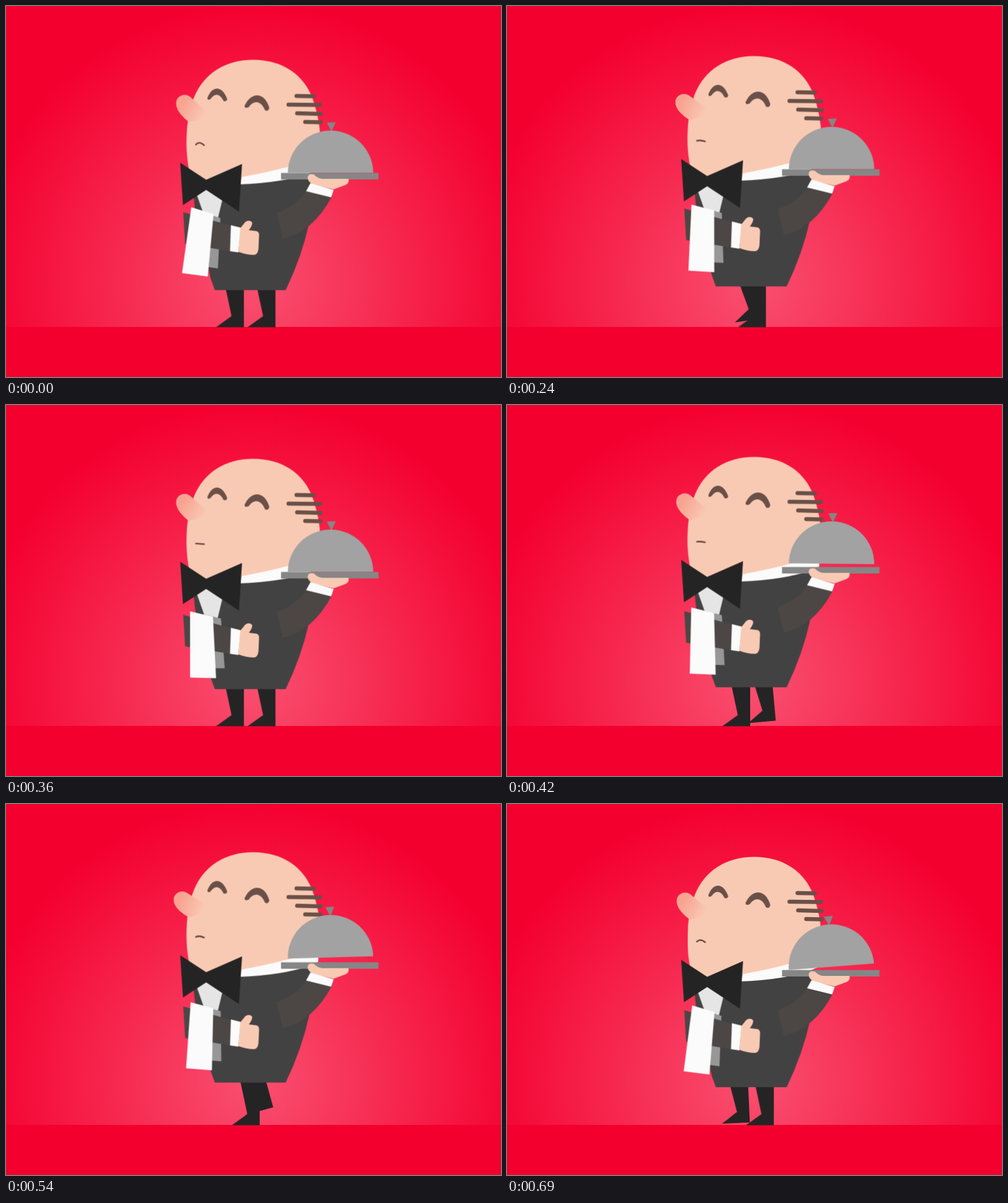
An HTML page that plays this animation: 800 by 600 pixels, repeating every 0.72 s.

```html
<!DOCTYPE html>
<html lang="en">
<head>
<meta charset="utf-8">
<title>Walking waiter</title>
<style>
  html, body { margin: 0; width: 100%; height: 100%; overflow: hidden; background: #f4002f; }
  svg { display: block; width: 100vw; height: 100vh; }

  .skin { fill: #f9cab3; }
  .black { fill: #252424; }
  .coat { fill: #434242; }
  .sleeve { fill: #4c4744; }
  .white { fill: #fbfbfb; }
  .steel { fill: #868686; }
  .hair { fill: none; stroke: #6a5048; stroke-width: 6.4; stroke-linecap: round; }
  .brow { fill: #6a5048; }
  .mouth { fill: none; stroke: #6a4c44; stroke-width: 2.6; stroke-linecap: round; }

  /* 24 poses per loop: each segment is split into 30 ms steps */
  .bob, .nose, .slide, .swing, .arm, .front, .back, .mouth, .tray, .lid {
    animation: 720ms steps(12) infinite;
  }

  .bob { animation-name: bob; animation-duration: 360ms; animation-timing-function: steps(6); }
  @keyframes bob { 50% { transform: translateY(-9px); } }

  .nose {
    transform-origin: 325px 183px;
    animation-name: nose; animation-duration: 360ms; animation-timing-function: steps(6);
  }
  @keyframes nose { 0%, 100% { transform: rotate(0deg); } 50% { transform: rotate(-10deg); } }

  .slide { animation-name: slide; }
  @keyframes slide {
    0%, 100% { transform: translateX(0); }
    50% { transform: translateX(51px); }
  }
  .swing {
    transform-origin: 384px 437px;
    animation-name: swing; animation-timing-function: steps(6);
  }
  @keyframes swing {
    0%, 50%, 100% { transform: translateY(0) rotate(0deg); }
    75% { transform: translateY(var(--lift)) rotate(var(--turn)); }
  }
  .late, .late .swing { animation-delay: -360ms; }

  .arm { animation-name: arm; animation-duration: 240ms; animation-timing-function: steps(4); }
  @keyframes arm { 50% { transform: translateY(5.8px); } }

  .front { animation-name: front; }
  @keyframes front {
    0%, 100% { d: path("M299 325L335 336L325.5 437L284 431.5Z"); }
    50% { d: path("M297 327.5L334 336L339 435.5L297 434.5Z"); }
  }
  .back { animation-name: back; }
  @keyframes back {
    0%, 100% { d: path("M318 333L346 342.5L342 424L308 419Z"); }
    50% { d: path("M318 332L347 339L353 419.5L320 419.5Z"); }
  }

  .mouth { animation-name: mouth; }
  @keyframes mouth {
    0%, 100% { d: path("M306.5 223.5Q312 217.5 319.5 224.5"); }
    50% { d: path("M306.5 223.5Q312 224 319.5 224.5"); }
  }

  .tray { animation-name: tray; animation-timing-function: steps(4); }
  @keyframes tray {
    0%, 50%, 83.3333%, 100% { transform: translateY(0); }
    66.6667% { transform: translateY(-10px); }
  }
  .lid {
    transform-origin: 455px 269.5px;
    animation-name: lid; animation-timing-function: steps(4);
  }
  @keyframes lid {
    0%, 50%, 100% { transform: translateY(0) rotate(0deg); }
    66.6667% { transform: translateY(-12px) rotate(1.2deg); }
    83.3333%, 95.8333% { transform: translateY(0) rotate(-4.4deg); }
    95.8333% { animation-timing-function: steps(1); }
  }
</style>
</head>
<body>
<svg viewBox="0 0 800 600" preserveAspectRatio="none">
  <defs>
    <radialGradient id="glow" gradientUnits="userSpaceOnUse" cx="400" cy="448" r="450">
      <stop offset="0" stop-color="#f95070"/>
      <stop offset="1" stop-color="#f4002f"/>
    </radialGradient>
    <linearGradient id="blush" gradientUnits="userSpaceOnUse" x1="286" y1="154" x2="323" y2="175">
      <stop offset="0" stop-color="#f8a392"/>
      <stop offset="1" stop-color="#f9cab3"/>
    </linearGradient>
    <path id="leg" d="M350 435H384V519H339L364 501Z"/>
  </defs>

  <rect width="800" height="519" fill="url(#glow)"/>
  <rect y="519" width="800" height="81" fill="#f4002f"/>

  <g transform="translate(.5 .5)">
    <g class="black">
      <g class="slide"><use href="#leg" class="swing" style="--lift:-26px;--turn:-15.5deg"/></g>
      <g class="slide late"><use href="#leg" class="swing" style="--lift:-20px;--turn:-12deg"/></g>
    </g>

    <g class="bob">
      <path class="white" d="M370 278L460 245L506 225L504 264L440 292H370Z"/>
      <path class="skin" d="M399 86.500C447 86.500 481 111 495 149C503 173 508 196 507 218C500 244 475 256 450 261Q420 269 381 276L378 285H301C294 265 290 238 291.500 208C292.500 185 296 167 303 148C319 109 353 86.500 399 86.500Z"/>

      <path class="nose" fill="url(#blush)" d="M295 187Q278 174 275 162Q272 147 285 143.500Q294 142 300 149L327 173Q318 183 295 187Z"/>
      <path class="brow" d="M325 148Q331 133 341 133Q351 134 357 150Q356 155 351 153Q346 143 340 143Q335 143 330 150Q325 153 325 148Z"/>
      <path class="brow" d="M385 161Q393 144 406 144Q419 145 425 164Q424 171 418 168Q413 156 405 155Q397 155 392 163Q385 166 385 161Z"/>
      <path class="mouth" d="M306.5 223.5Q312 217.5 319.5 224.5"/>
      <path class="hair" d="M469 145L497 145.500M456 159L507 159.500M470 173L508 174M483 187L508 187.500"/>

      <path class="coat" d="M302 300L376 288Q445 286 494 269L497 275L489.500 350Q478 404 451.500 459H337L330.500 441L305 329Z"/>
      <path fill="#e5e5e5" d="M308 305L323 295L349 313.500L341 347L321 342Z"/>
      <path class="black" d="M281 253L323 280.500L381 255L376 332L323 297L285.500 321.500Z"/>

      <g class="arm">
        <path class="back" fill="#979797" d="M318 333L346 342.5L342 424L308 419Z"/>
        <path class="sleeve" d="M286 333L364 355L361 396L289 384Z"/>
        <path class="white" d="M363 354L379 358L375 398L361.5 396Z"/>
        <path class="skin" d="M378 359L386 349Q392 344.500 397 349Q399 353 392 362L404 363.500Q409 364.500 408.500 371L407.500 393Q406 402 400 402Q388 402 375 397Z"/>
        <path class="front white" d="M299 325L335 336L325.5 437L284 431.5Z"/>
      </g>

      <g class="tray">
        <path class="sleeve" d="M485 298L526.500 307Q496 365 446.500 376L437 334Q472 321 485 298Z"/>
        <g class="lid">
          <path class="steel" d="M518 188L532.500 187.500L525.500 203Z"/>
          <path fill="#a2a2a2" d="M455 269.500A69 68.500 0 0 1 593 269.500Z"/>
        </g>
        <rect class="steel" x="444" y="269.500" width="157.500" height="10.500"/>
        <path class="skin" d="M487 277Q488 270 497 272Q503 278 510 279H553Q555 286 548 289L529 296L495 288Q487 283 487 277Z"/>
        <path class="white" d="M491.500 286L529 297L525 309L484.500 299Z"/>
      </g>
    </g>
  </g>
</svg>
</body>
</html>
```
